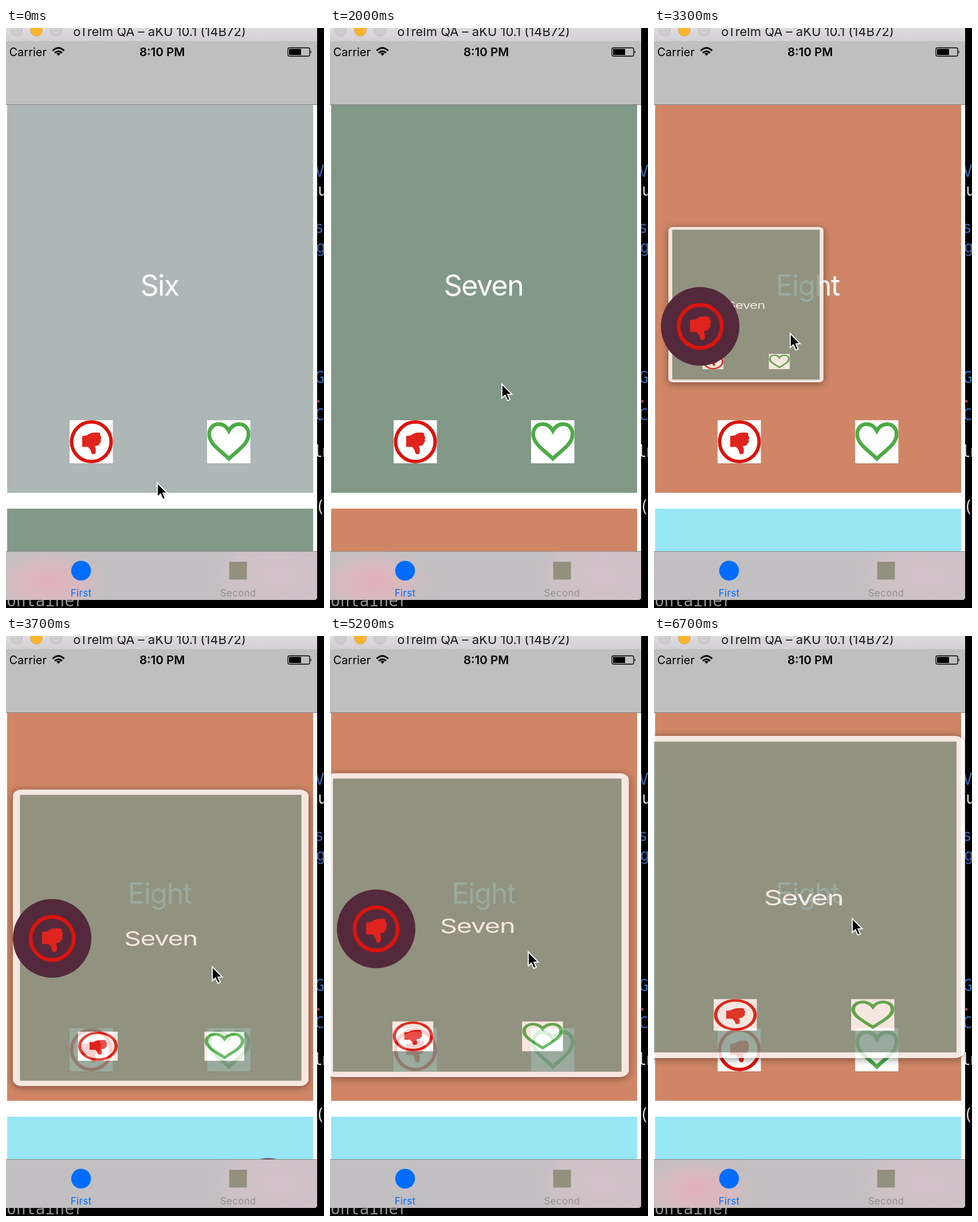
Recreate the animation shown at these times as an HTML page. Size 555 px wide and 1010 px high, loop 6.8 s.

```html
<!DOCTYPE html>
<html lang="en">
<head>
<meta charset="utf-8">
<title>Card list</title>
<style>
html, body { margin: 0; width: 100%; height: 100%; overflow: hidden; background: #000; }
svg { display: block; width: 100vw; height: 100vh; }
text { font-family: Inter, Roboto, sans-serif; }
.label { font-size: 50px; letter-spacing: -1.5px; fill: #fff; text-anchor: middle; }
.mid { text-anchor: middle; }
.code text { font: 28px "DejaVu Sans Mono", monospace; }
</style>
</head>
<body>
<svg viewBox="0 0 555 1010">
  <defs>
    <clipPath id="window"><path d="M0 0H543V990Q543 996 537 996H0Z"/></clipPath>
    <clipPath id="bar"><rect y="912" width="543" height="84"/></clipPath>
    <filter id="shadow" filterUnits="userSpaceOnUse" x="-200" y="0" width="1000" height="1010">
      <feDropShadow dx="0" dy="2" stdDeviation="7" flood-color="#000" flood-opacity=".55"/>
    </filter>
    <radialGradient id="redGlow">
      <stop offset="0" stop-color="#e2aeb6"/><stop offset=".5" stop-color="#dcb9bf" stop-opacity=".8"/>
      <stop offset="1" stop-color="#c9bdc0" stop-opacity="0"/>
    </radialGradient>
    <radialGradient id="paleGlow">
      <stop offset="0" stop-color="#d3c1c8"/><stop offset=".7" stop-color="#d1c2c8" stop-opacity=".8"/>
      <stop offset="1" stop-color="#c5bfc2" stop-opacity="0"/>
    </radialGradient>
    <linearGradient id="title" x2="0" y2="1">
      <stop offset="0" stop-color="#dddbde"/><stop offset="1" stop-color="#d2d0d3"/>
    </linearGradient>
    <g id="nope">
      <circle r="34.5" fill="none" stroke="#da150e" stroke-width="6"/>
      <path fill="#e0241d" d="M-16-10L-8-11Q-2-16 6-16H12Q17-15 15-11Q19-8 16-4Q18 0 14 3Q14 7 8 7L6 8Q9 14 7 20Q3 24 0 20Q-1 13-6 9L-16 9Z"/>
    </g>
    <path id="heart" fill="none" stroke="#4bab46" stroke-width="6.5" stroke-miterlimit="6"
      d="M0-19C-5-28-11-30.7-18-30.7C-28-30.7-34.3-23-34.3-13C-34.3 4-15 15 0 29.4C15 15 34.3 4 34.3-13C34.3-23 28-30.7 18-30.7C11-30.7 5-28 0-19Z"/>
    <g id="buttons">
      <rect x="-157" y="-37.5" width="75.5" height="75"/>
      <rect x="83" y="-37.5" width="75.5" height="75"/>
      <use href="#nope" x="-119"/><use href="#heart" x="121"/>
    </g>
  </defs>

  <rect width="555" height="1010"/>
  <g class="code" id="code"></g>

  <g clip-path="url(#window)">
    <rect width="543" height="996" fill="#fff"/>
    <g id="list"></g>
    <g id="lifted" filter="url(#shadow)" opacity=".8">
      <g id="liftedBody">
        <rect x="-280.5" y="-382.5" width="561" height="765" rx="17" fill="#fff"/>
        <rect x="-267" y="-369" width="534" height="738" fill="#829587"/>
        <text class="label" y="20">Seven</text>
        <use href="#buttons" y="280" fill="#fff"/>
      </g>
    </g>
    <g id="nopeBadge"><circle r="68.5" fill="#54293b"/><use href="#nope" transform="scale(1.09)"/></g>
    <g id="heartBadge"><circle r="68.5" fill="#54293b"/><use href="#heart" transform="scale(1.09)"/></g>

    <rect width="543" height="23" fill="url(#title)"/>
    <g stroke="#bcbabd">
      <circle cx="18.500" cy="4" r="10" fill="#cfcdd0"/>
      <circle cx="53" cy="4" r="10" fill="#fdb32b" stroke="#e7a02a"/>
      <circle cx="87.500" cy="4" r="10" fill="#cfcdd0"/>
    </g>
    <text class="mid" x="268" y="14" font-size="22" fill="#1c1c1c">oTrelm QA – aKU 10.1 (14B72)</text>

    <rect y="23" width="543" height="111" fill="#bfbfbf"/>
    <path d="M0 133.500H543" stroke="#000" stroke-opacity=".35"/>
    <text x="5.500" y="49" font-size="20">Carrier</text>
    <g fill="none" stroke="#000" stroke-width="3">
      <path d="M81.500 39.500Q91.500 30 101.500 39.500M85 43.500Q91.500 37.500 98 43.500"/>
      <path d="M88 44.500Q91.500 42 95 44.500L91.500 48.500Z" fill="#000" stroke="none"/>
    </g>
    <text class="mid" x="272.500" y="49" font-size="20.500" font-weight="600">8:10 PM</text>
    <rect x="492" y="34.500" width="38" height="14.500" rx="2.500" fill="none" stroke="#000" stroke-width="1.300"/>
    <path d="M494 36.500H515V47H494ZM531.500 39Q534.500 41.700 531.500 44.500Z"/>

    <rect y="912" width="543" height="84" fill="#c1bfc1"/>
    <g clip-path="url(#bar)">
      <ellipse id="nopeGlow" cx="75" cy="965" rx="115" ry="65" fill="url(#redGlow)"/>
      <ellipse id="heartGlow" cx="475" cy="953" rx="125" ry="80" fill="url(#paleGlow)"/>
    </g>
    <path d="M0 911.500H543" stroke="#8d8d8d"/>
    <circle cx="131" cy="945" r="17.300" fill="#006dff"/>
    <rect x="389.500" y="929.500" width="31" height="31" fill="#92917f"/>
    <g class="mid" font-size="17" letter-spacing=".3">
      <text x="131" y="990" fill="#006dff">First</text>
      <text x="405" y="990" fill="#92918c">Second</text>
    </g>
  </g>

  <path id="cursor" d="M0 0V24.500L5.500 19.500L9.700 28.700L14 26.800L10 17.800H17.500Z" stroke="#fff" stroke-width="1.800"/>
</svg>

<script>
const LOOP = 6800, STEP = 100, PITCH = 703, REST = 985;
const $ = id => document.getElementById(id);

$("code").innerHTML = [
  ["V", 539, 259, "#3c62b4"], ["u", 544, 292, "#d8d8d8"], ["su", 538, 357, "#3c62b4"],
  ["g", 541, 391, "#3c62b4"], ["GE", 539, 618, "#2f6fc4"], [".r", 537, 652, "#c0404e"],
  ["C", 539, 683, "#3c62b4"], ["lm", 536, 747, "#d8d8d8"], ["(", 540, 843, "#d8d8d8"],
  ["ontainer", 1, 1007, "#92968f"]
].map(([s, x, y, c]) => `<text x="${x}" y="${y}" fill="${c}">${s}</text>`).join("");

const cards = [["Six", "#adb7b6"], ["Seven", "#829987"], ["Eight", "#d08666"], ["Nine", "#97e6f3"]];
$("list").innerHTML = cards.map(([name, color]) => `<g>
  <rect x="2" width="534" height="675.500" fill="${color}"/>
  <text class="label" x="268" y="332">${name}</text>
  <use href="#buttons" x="268" y="586.500" fill="#fff"/></g>`).join("");
const rows = [...$("list").children];

// Keys: [time, value, ...]
const cardKeys = [
  [2100, 268, 471, 561], [2400, 215, 450, 400], [2700, 165, 429, 264], [3200, 152, 470, 242],
  [3700, 270, 525.5, 516], [3950, 330, 524, 290], [4300, 254, 511, 510], [4700, 175, 505, 300],
  [5200, 257, 503.5, 529], [5700, 300, 508, 440], [6300, 263, 512, 527], [6700, 261, 454.5, 561]
];
const cursorKeys = [
  [300, 264, 792], [700, 285, 640], [1000, 300, 620], [2100, 300, 620], [2700, 240, 477],
  [3200, 228, 520], [3700, 360, 576], [3950, 418, 573], [4300, 331, 556], [4700, 258, 552],
  [5200, 346, 550], [5700, 385, 557], [6300, 347, 556], [6700, 346, 492]
];
const nopeKeys = [
  [2200, REST], [2700, 521], [3000, 518], [3700, 526.5], [4050, REST],
  [4650, REST], [5000, 520], [5200, 510], [5450, 512], [5800, REST]
];
const heartKeys = [
  [3600, REST], [3700, 978], [4000, 530], [4300, 515], [4450, 515], [4800, REST],
  [5450, REST], [5800, 514], [6200, 514], [6550, REST]
];
const scrollKeys = [[300, 0], [700, 172], [1200, PITCH]];

// Monotone cubic through the keys, held at both ends.
function at(keys, t, k = 1) {
  const last = keys.length - 1;
  if (t <= keys[0][0]) return keys[0][k];
  if (t >= keys[last][0]) return keys[last][k];
  const i = keys.findIndex(p => p[0] > t) - 1;
  const slope = j => (keys[j + 1][k] - keys[j][k]) / (keys[j + 1][0] - keys[j][0]);
  const tangent = j => {
    if (j === 0 || j === last) return 0;
    const a = slope(j - 1), b = slope(j);
    return a * b > 0 ? 2 * a * b / (a + b) : 0;
  };
  const [a, b] = [keys[i], keys[i + 1]], h = b[0] - a[0], u = (t - a[0]) / h;
  const ease = u * u * (3 - 2 * u);
  return a[k] + (b[k] - a[k]) * ease
    + h * u * (1 - u) * ((1 - u) * tangent(i) - u * tangent(i + 1));
}

const clamp = v => Math.max(0, Math.min(1, v));
const move = (el, x, y, scale = "") => el.setAttribute("transform", `translate(${x} ${y}) ${scale}`);

function badge(name, x, keys, t) {
  const y = at(keys, t);
  move($(name + "Badge"), x, y);
  $(name + "Glow").setAttribute("opacity", clamp((y - 850) / 120));
}

function draw(t) {
  const lifted = t >= 2100;
  const closeGap = PITCH * (1 - (1 - clamp((t - 2200) / 670)) ** 3);
  const scroll = at(scrollKeys, t) + closeGap;
  rows.forEach((row, i) => move(row, 0, 134 + i * PITCH - scroll));
  rows[1].style.display = lifted ? "none" : "";

  $("lifted").style.display = lifted ? "" : "none";
  const size = at(cardKeys, t, 3);
  move($("liftedBody"), at(cardKeys, t, 1), at(cardKeys, t, 2), `scale(${size / 561} ${size / 765})`);

  badge("nope", 80.5, nopeKeys, t);
  badge("heart", 457.5, heartKeys, t);
  move($("cursor"), at(cursorKeys, t, 1), at(cursorKeys, t, 2));
}

const start = performance.now();
function tick() {
  const t = (performance.now() - start) % LOOP;
  draw(Math.floor(t / STEP) * STEP);
  requestAnimationFrame(tick);
}
tick();
</script>
</body>
</html>
```
